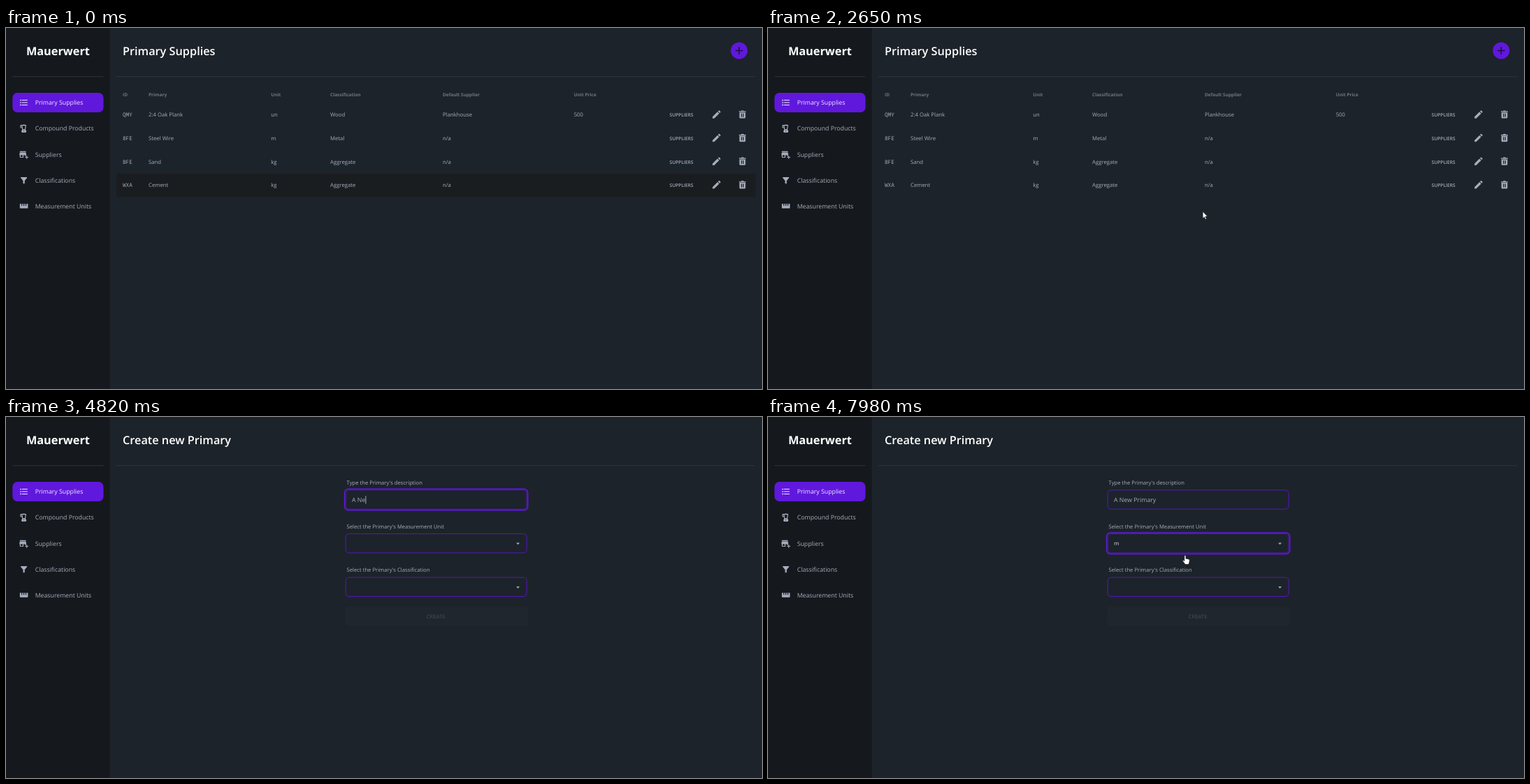
An HTML page that plays this animation: 1082 px wide and 518 px high, repeating every 8000 ms.

```html
<!DOCTYPE html>
<html lang="en">
<head>
<meta charset="utf-8">
<title>Primary Supplies</title>
<style>
  html, body { margin: 0; width: 100%; height: 100%; overflow: hidden; background: #1d232a; }
  svg { display: block; width: 100%; height: 100%; }
  text { font-family: "Open Sans", "Noto Sans", sans-serif; fill: #a6adbb; white-space: pre; text-rendering: geometricPrecision; }
  .brand, .title { font-size: 16.3px; font-weight: 600; fill: #fff; }
  .brand { font-weight: 700; text-anchor: middle; }
  .nav, .field { font-size: 8.75px; }
  .on { fill: #f0eafd; }
  .head { font-size: 6.55px; font-weight: 700; fill: #6f7681; }
  .cell { font-size: 7.75px; }
  .id { font-family: "Noto Sans Mono", "DejaVu Sans Mono", monospace; font-size: 7.7px; font-weight: 500; }
  .small { font-size: 6.6px; font-weight: 600; }
  .label { font-size: 7.68px; }
  .unit { font-size: 7.8px; font-weight: 600; }
  .create { font-size: 7.6px; font-weight: 600; fill: #40464e; text-anchor: middle; }
  .icon { fill: #a6adbb; fill-rule: evenodd; }
  .icon.on { fill: #f0eafd; }
  .rule { fill: #2c323a; }
  .box { fill: none; stroke: #5418c0; stroke-width: 1; }
  .ring { fill: none; stroke: #6018dc; stroke-width: 1.5; }
  .pointer { fill: #fff; stroke: #14171b; stroke-width: .7; stroke-linejoin: round; }
</style>
</head>
<body>
<svg id="stage" viewBox="0 0 1082 518"></svg>
<script>
const LOOP = 8000;
const ROW_TOP = 108.1, ROW_H = 33.6;
const PURPLE = '#6018dc', PURPLE_HOVER = '#5014b8';

const ICONS = {
  list: 'M4 10.5a1.5 1.5 0 100 3 1.5 1.5 0 000-3zM4 4.5a1.5 1.5 0 100 3 1.5 1.5 0 000-3zM4 16.5a1.5 1.5 0 100 3 1.5 1.5 0 000-3zM7 5h14v2H7zM7 11h14v2H7zM7 17h14v2H7z',
  blender: 'M16.13 15.13L18 3h-4V2h-4v1H5c-1.1 0-2 .9-2 2v4c0 1.1.9 2 2 2h2.23l.64 4.13C6.74 16.05 6 17.43 6 19v1c0 1.1.9 2 2 2h8c1.1 0 2-.9 2-2v-1c0-1.57-.74-2.95-1.87-3.87zM5 9V5h1.31l.62 4zM12 19a1 1 0 110-2 1 1 0 010 2zM14.29 14H9.72L8.33 5h7.34z',
  shop: 'M15 17h2v-3h1v-2l-1-5H2l-1 5v2h1v6h9v-6h4zM9 18H4v-4h5zM2 4h15v2H2zM20 18v-3h-2v3h-3v2h3v3h2v-3h3v-2z',
  funnel: 'M4.25 5.6L10 13v6q0 1 1 1h2q1 0 1-1v-6l5.75-7.4Q20.3 4 19 4H5Q3.7 4 4.25 5.6z',
  ruler: 'M3 6h3v5h2V6h3v5h2V6h3v5h2V6h3q1 0 1 1v9q0 1-1 1H3q-1 0-1-1V7q0-1 1-1z',
  pencil: 'M3 17.25V21h3.75L17.8 9.94l-3.75-3.75zM20.7 7.04q.7-.7 0-1.4l-2.33-2.35q-.7-.7-1.4 0l-1.84 1.83 3.75 3.75z',
  bin: 'M9 3h6v1.5h5v2H4v-2h5zM5 7.5h14V19q0 2-2 2H7q-2 0-2-2zM9 10v8h2v-8zM13 10v8h2v-8z'
};
const ARROW = 'M0 0V10L2.3 7.9 3.9 11.4 5.5 10.7 3.9 7.3H7z';
const HAND = 'M-1.1 1.2a1.1 1.1 0 012.2 0V4.6l3.9.8q1.5.3 1.4 1.8l-.5 3q-.2 1.4-1 2.8H0q-1-1.8-2.9-4-1-1.4-.2-1.8.9-.4 2 .8z';

const NAV = [['list', 'Primary Supplies'], ['blender', 'Compound Products'], ['shop', 'Suppliers'],
  ['funnel', 'Classifications'], ['ruler', 'Measurement Units']];
const COLS = [167, 204, 379.3, 464, 625, 812.7];
const HEADS = ['ID', 'Primary', 'Unit', 'Classification', 'Default Supplier', 'Unit Price'];
const ROWS = [
  ['QMY', '2:4 Oak Plank', 'un', 'Wood', 'Plankhouse', '500'],
  ['8FE', 'Steel Wire', 'm', 'Metal', 'n/a', ''],
  ['BFE', 'Sand', 'kg', 'Aggregate', 'n/a', ''],
  ['WXA', 'Cement', 'kg', 'Aggregate', 'n/a', '']
];
const FIELDS = [[104.8, "Type the Primary's description"], [167.5, "Select the Primary's Measurement Unit"],
  [230.2, "Select the Primary's Classification"]];

const text = (cls, x, y, s, id = '') => `<text class="${cls}" x="${x}" y="${y}" id="${id}">${s}</text>`;
const rect = (x, y, w, h, r, attrs) => `<rect x="${x}" y="${y}" width="${w}" height="${h}" rx="${r}" ${attrs}/>`;
const icon = (name, cx, cy, k = .58, cls = '') =>
  `<path class="icon ${cls}" transform="translate(${cx} ${cy}) scale(${k}) translate(-12 -12)" d="${ICONS[name]}"/>`;

function sidebar() {
  return rect(0, 0, 148.5, 518, 0, 'fill="#15191e"') + text('brand', 74.4, 39.2, 'Mauerwert') +
    rect(9.3, 69.2, 130.2, 1.1, 0, 'class="rule"') + rect(9.3, 93, 130.2, 28, 7, `fill="${PURPLE}"`) +
    NAV.map(([name, label], i) => {
      const y = 107 + i * 37.2, on = i ? '' : 'on';
      return icon(name, 25.6, y, .58, on) + text('nav ' + on, 41.7, y + 3.2, label);
    }).join('');
}

function listPage() {
  const rows = ROWS.map((row, i) => {
    const y = 124.4 + i * ROW_H;
    return row.map((s, c) => text(c ? 'cell' : 'id', COLS[c], y + 2.9, s)).join('') +
      text('small', 949.8, y + 2.9, 'SUPPLIERS') + icon('pencil', 1017, y - .4, .64) + icon('bin', 1054, y - .4, .62);
  }).join('');
  return '<g id="list">' + text('title', 167, 39.2, 'Primary Supplies') +
    '<circle id="add" cx="1049.3" cy="32.6" r="12"/><path d="M1044 32.6h10.6M1049.3 27.3v10.6" stroke="#1a1335" stroke-width="1.5"/>' +
    rect(158, 0, 915, ROW_H, 3, 'id="hover" fill="#1a1d20"') +
    HEADS.map((s, c) => text('head', COLS[c], 98.1, s)).join('') + rows + '</g>';
}

function formPage() {
  const fields = FIELDS.map(([y, label], i) =>
    text('label', 487.6, y - 7.8, label) + rect(486.2, y, 259, 27.4, 4.4, 'class="box"') +
    (i ? `<path d="M730.2 ${y + 13}h5l-2.5 2.7z" fill="#a6adbb"/>` : '')).join('');
  return '<g id="form">' + text('title', 167, 39.2, 'Create new Primary') + fields +
    rect(484.6, 0, 262.2, 30.6, 5.6, 'id="ring" class="ring"') +
    text('field', 495, 122.4, '', 'input') + rect(0, 113.2, .8, 11.4, 0, 'id="caret" fill="#c3c8d2"') +
    text('unit', 495, 184.2, 'm', 'unit') +
    rect(485.5, 272.2, 262, 27.8, 4.6, 'fill="#20262d"') + text('create', 615.2, 288.5, 'CREATE') + '</g>';
}

document.getElementById('stage').innerHTML = sidebar() +
  rect(157, 69.2, 915, 1.1, 0, 'class="rule"') + listPage() + formPage() + '<path id="pointer" class="pointer"/>';

const el = {};
for (const id of ['list', 'add', 'hover', 'form', 'ring', 'input', 'caret', 'unit', 'pointer'])
  el[id] = document.getElementById(id);

// start, step count, step length, end x, end y
const MOVES = [
  [1020, 7, 75, 545, 124], [1800, 4, 76, 522.5, 194.3], [2100, 2, 70, 515, 268],
  [2340, 3, 79, 560, 296], [2577, 8, 79, 1057.3, 34.3], [3280, 4, 80, 612, 208],
  [6520, 5, 77.5, 606.2, 171], [7330, 3, 80, 597, 198.5]
];
const KEYS = [4090, 4340, 4760, 4820, 4980, 5140, 5400, 5480, 5560, 5640, 5720, 5880, 5950];
const TYPED = 'A New Primary';
const POINTER_ON = 1020, FORM_AT = 3360, FOCUS_AT = 3690, CARET_OFF = 6520, SELECT_AT = 6910, UNIT_AT = 7980;

function pointerAt(t) {
  let x = 505, y = 216;
  for (const [start, n, len, x1, y1] of MOVES) {
    if (t < start) break;
    const p = Math.min(n, Math.floor((t - start) / len) + 1) / n;
    x += (x1 - x) * p;
    y += (y1 - y) * p;
  }
  // hidden while typing
  return { x, y, shown: (t >= POINTER_ON && t < FOCUS_AT) || t >= CARET_OFF };
}

const show = (node, on) => node.setAttribute('visibility', on ? 'inherit' : 'hidden');

function draw(t) {
  const { x, y, shown } = pointerAt(t);
  const form = t >= FORM_AT;
  show(el.list, !form);
  show(el.form, form);

  const overAdd = !form && Math.hypot(x - 1049.3, y - 32.6) < 12;
  const row = shown ? Math.floor((y - ROW_TOP) / ROW_H) : 3;
  show(el.hover, !form && row >= 0 && row < 4);
  el.hover.setAttribute('y', ROW_TOP + row * ROW_H);
  el.add.setAttribute('fill', overAdd ? PURPLE_HOVER : PURPLE);

  const value = TYPED.slice(0, KEYS.filter(k => t >= k).length);
  el.input.textContent = value || 'Primary Supply';
  el.input.style.fill = value ? '#a6adbb' : '#8f96a2';
  const width = value ? el.input.getComputedTextLength() : 0;
  el.caret.setAttribute('x', 495.2 + width);
  show(el.caret, form && t >= FOCUS_AT && t < CARET_OFF);
  show(el.ring, form && t >= FOCUS_AT);
  el.ring.setAttribute('y', FIELDS[t < SELECT_AT ? 0 : 1][0] - 1.6);
  show(el.unit, form && t >= UNIT_AT);

  const hand = overAdd || (form && y > 167 && y < 200);
  show(el.pointer, shown);
  el.pointer.setAttribute('d', hand ? HAND : ARROW);
  el.pointer.setAttribute('transform', `translate(${x} ${y})`);
}

const begin = performance.now();
function tick() {
  draw((performance.now() - begin) % LOOP);
  requestAnimationFrame(tick);
}
tick();
</script>
</body>
</html>
```
